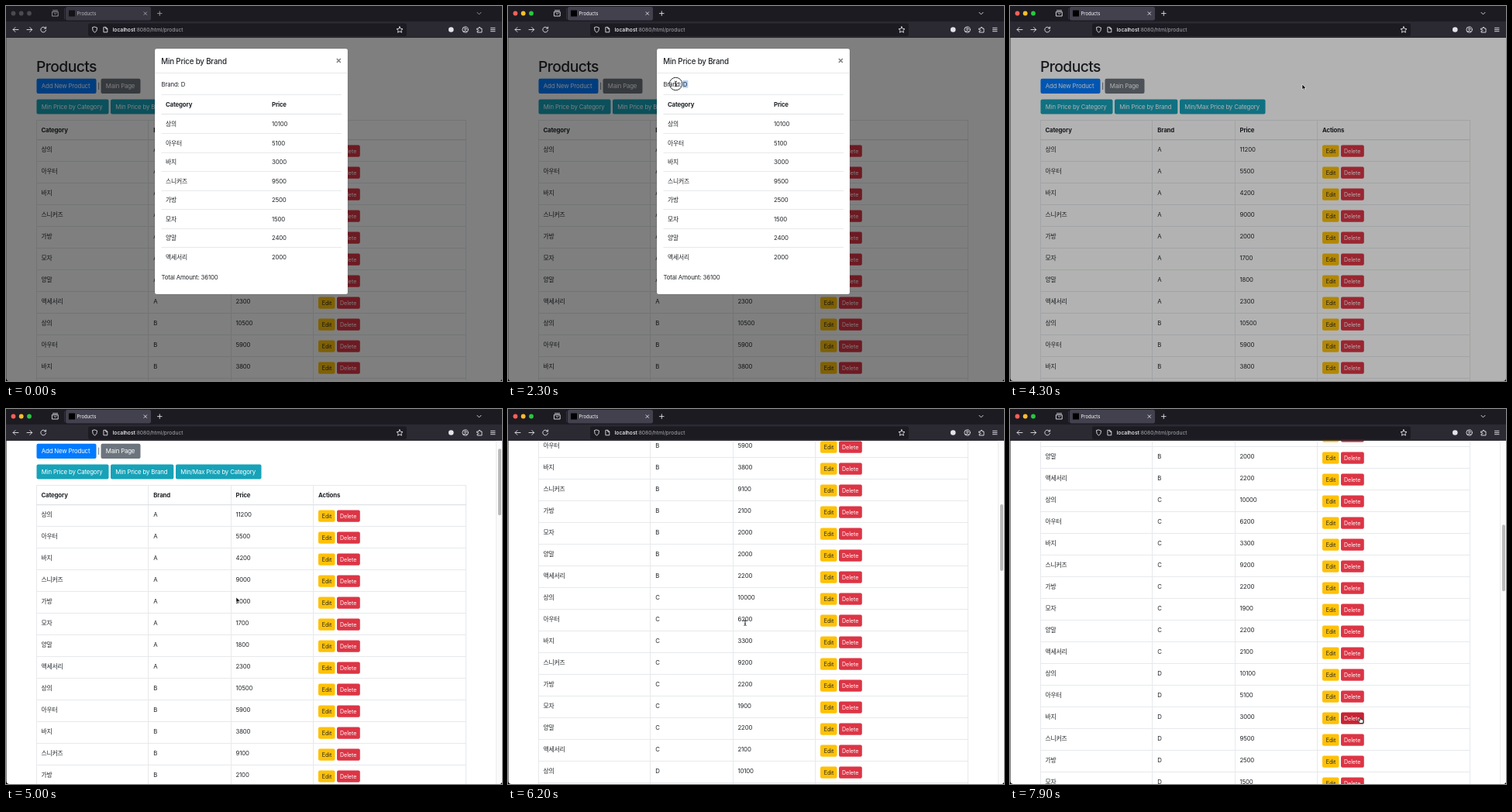
These frames come from a looping animation (640 px wide and 484 px high, 8 s). An HTML page:

```html
<!DOCTYPE html>
<html lang="ko">
<head>
<meta charset="utf-8">
<title>Products</title>
<style>
html, body { margin: 0; width: 100%; height: 100%; overflow: hidden; background: #000; }
svg { display: block; width: 640px; height: 484px; }
text {
  font: 7.8px Inter, "Noto Sans CJK KR", "Noto Sans CJK", sans-serif;
  letter-spacing: -.02em; fill: #212529; white-space: pre;
}
.b { font-weight: 700; }
.h1 { font-size: 19.3px; font-weight: 500; letter-spacing: -.03em; }
.title { font-size: 9.75px; font-weight: 500; }
.sm { font-size: 7px; letter-spacing: 0; }
.w { fill: #fff; }
.tab { font-size: 5.9px; fill: #fbfbfe; letter-spacing: 0; }
.url { font-size: 6.7px; fill: #a9a8b0; letter-spacing: 0; }
.url tspan { fill: #fbfbfe; font-weight: 500; }
.icon { fill: none; stroke: #e4e3ea; stroke-width: .9; stroke-linecap: round; stroke-linejoin: round; }
</style>
</head>
<body>
<svg id="stage" viewBox="0 0 640 484">
  <defs>
    <clipPath id="view"><path d="M.5 40.5H640V480Q640 484 636 484H4.500Q.5 484 .5 480Z"/></clipPath>
  </defs>
  <g clip-path="url(#view)">
    <rect y="40" width="640" height="444" fill="#fff"/>
    <g id="page"></g>
    <g id="bar">
      <rect x="632.5" y="40" width="8" height="444" fill="#fafafa"/>
      <path d="M632.500 40V484" stroke="#ececec"/>
      <rect id="thumb" x="635" width="4" height="86" rx="2" fill="#b9b9b9"/>
    </g>
    <rect id="backdrop" y="40" width="640" height="444"/>
    <g id="modal"></g>
  </g>

  <rect width="640" height="20.500" fill="#1c1b22"/>
  <rect y="20" width="640" height="20.500" fill="#2b2a33"/>
  <rect y="40" width="640" height=".6" fill="#121117"/>
  <g id="lights">
    <circle cx="9.500" cy="9.500" r="2.900"/><circle cx="19.700" cy="9.500" r="2.900"/><circle cx="30" cy="9.500" r="2.900"/>
  </g>
  <path d="M75.500 3V17" stroke="#45444d" stroke-width=".6"/>
  <rect id="tab" x="77" y="1" width="110" height="17.500" rx="2.200"/>
  <g id="top">
    <rect x="81" y="5.500" width="8" height="8" fill="#000"/>
    <text class="tab" x="91.500" y="11.700">Products</text>
    <g class="icon">
      <path d="M60.500 5.700H66.500M59.800 7.500H67.200V13H59.800ZM62 9.500Q63.500 11.500 65 9.500"/>
      <path d="M178 7.800L181.600 11.400M181.600 7.800L178 11.400M198.300 6.800V12.400M195.500 9.600H201.100M608 8.300L610.500 10.800L613 8.300"/>
    </g>
  </g>
  <rect x="106" y="22.500" width="411" height="16.500" rx="2.200" fill="#1c1b22"/>
  <text class="url" x="137.700" y="33"><tspan>localhost</tspan>:8080/html/product</text>
  <g class="icon">
    <path d="M16 30.500H9.200M12 27.600L9.100 30.500L12 33.400M27 30.500H33.600M30.800 27.600L33.700 30.500L30.800 33.400"/>
    <path d="M51 28.500A3.400 3.400 0 1 0 51.600 31.200M51.600 27V29H49.500"/>
    <path d="M114.500 27L117.500 28Q117.800 32.500 114.500 34.300Q111.200 32.500 111.500 28Z"/>
    <path d="M126.300 27.300H129L130.800 29.200V33.800H126.300ZM128.800 27.500V29.400H130.600"/>
    <path d="M508 26.700L509.200 29.300L512 29.600L509.900 31.500L510.500 34.200L508 32.800L505.500 34.200L506.100 31.500L504 29.600L506.800 29.300Z"/>
    <circle cx="592.600" cy="30.500" r="3.700"/><circle cx="592.600" cy="29.500" r="1.200"/><path d="M590.300 33Q592.600 30.700 594.900 33"/>
    <path d="M608 29H610V27.800Q611 26.500 612 27.800V29H614V34H608V32.500Q610 32.200 610 31.500Q610 30.700 608 30.500Z"/>
    <path d="M625.500 28.300H631M625.500 30.500H631M625.500 32.700H631"/>
  </g>
  <circle cx="574.300" cy="30.500" r="3.300" fill="#e4e3ea"/>

  <g id="mouse">
    <circle id="press" r="8.200" fill="none" stroke="#333"/>
    <path id="arrow" d="M0 0V6.800L1.600 5.400L2.700 7.900L3.900 7.400L2.800 5H5Z" fill="#000" stroke="#fff" stroke-width=".6"/>
    <path id="beam" d="M-1.600 -3.400Q0 -3.400 0 -2.300Q0 -3.400 1.600 -3.400M0 -2.500V2.500M-1.600 3.400Q0 3.400 0 2.300Q0 3.400 1.600 3.400M-.8 .9H.8" fill="none" stroke="#222" stroke-width=".9"/>
    <path id="hand" d="M-.7 -3Q0 -3.900 .6 -3V-.6L3.300 .2Q4.200 .6 3.900 2L3.300 4.500H-.6L-2.800 1.500Q-2.800 .5 -1.800 .9L-.7 1.800Z" fill="#fff" stroke="#111" stroke-width=".7"/>
  </g>
</svg>
<script>
const LOOP = 8000, STEP = 100, ROW = 28, TOP = 173;
const CATEGORIES = ["상의", "아우터", "바지", "스니커즈", "가방", "모자", "양말", "액세서리"];
const PRICES = {
  A: [11200, 5500, 4200, 9000, 2000, 1700, 1800, 2300],
  B: [10500, 5900, 3800, 9100, 2100, 2000, 2000, 2200],
  C: [10000, 6200, 3300, 9200, 2200, 1900, 2200, 2100],
  D: [10100, 5100, 3000, 9500, 2500, 1500, 2400, 2000]
};
const COLOR = {
  blue: "#007bff", grey: "#6c757d", teal: "#17a2b8",
  edit: "#ffc107", editHover: "#e0a800", del: "#dc3545", delHover: "#c82333"
};

// Tables of [time, value] and [time, x, y]
const SCROLL = [[4600, 0], [5000, 49], [5600, 230], [6200, 390], [6800, 490], [7200, 516]];
const MOUSE = [
  [1300, 330, 190], [2000, 234, 101], [2300, 216.5, 100.5], [3300, 216.5, 100.5],
  [3900, 424, 70], [4100, 424, 70], [4300, 377, 101], [5000, 297, 243],
  [6200, 306, 276], [7200, 335, 300], [7900, 452, 401]
];
const FOCUS_AT = 1400, SELECT = [2100, 4000], CLOSE_AT = 4090, FADE = 150;
const PRESSES = [[2000, 2400], [4000, 4050]];
const BEAMS = [[1900, 3400], [5500, 7250]];

const $ = id => document.getElementById(id);
const clamp = v => Math.max(0, Math.min(1, v));
const within = (t, [a, b]) => t >= a && t < b;
const show = (node, on) => node.setAttribute("visibility", on ? "inherit" : "hidden");

function add(parent, tag, attrs, content) {
  const node = document.createElementNS("http://www.w3.org/2000/svg", tag);
  for (const k in attrs) node.setAttribute(k, attrs[k]);
  if (content !== undefined) node.textContent = content;
  return parent.appendChild(node);
}
const label = (g, x, y, s, cls = "") => add(g, "text", { x, y, class: cls }, s);
const line = (g, d, stroke = "#e6e9ec", width = 1) =>
  add(g, "path", { d, stroke, "stroke-width": width, fill: "none" });

function button(g, x, y, width, height, fill, s, cls, pad) {
  const box = add(g, "rect", { x, y, width, height, rx: 2, fill });
  label(g, x + pad, y + height / 2 + 2.8, s, cls);
  return box;
}

function buildPage(g) {
  label(g, 39, 85.3, "Products", "h1");
  button(g, 39.5, 93.8, 77, 19.2, COLOR.blue, "Add New Product", "w", 6.3);
  label(g, 118.4, 105.8, "|");
  button(g, 122.5, 93.8, 51, 19.2, COLOR.grey, "Main Page", "w", 6.3);
  button(g, 39.5, 120.6, 93, 19, COLOR.teal, "Min Price by Category", "w", 6.3);
  button(g, 135, 120.6, 81.3, 19, COLOR.teal, "Min Price by Brand", "w", 6.3);
  button(g, 219, 120.6, 110.5, 19, COLOR.teal, "Min/Max Price by Category", "w", 6.3);

  const cols = [45.5, 190.3, 296.5, 403];
  ["Category", "Brand", "Price", "Actions"].forEach((s, i) => label(g, cols[i], 163.2, s, "b"));

  const rows = [];
  for (const brand in PRICES) PRICES[brand].forEach((price, i) => {
    const y = TOP + rows.length * ROW;
    [CATEGORIES[i], brand, price].forEach((s, c) => label(g, cols[c], y + 14.9, s));
    rows.push({
      edit: button(g, 403, y + 6.5, 21.5, 15.2, COLOR.edit, "Edit", "sm", 4.7),
      del: button(g, 427, y + 6.5, 29.8, 15.2, COLOR.del, "Delete", "sm w", 4)
    });
    line(g, `M39.5 ${y + ROW - .5}H594`);
  });
  const end = TOP + rows.length * ROW;
  line(g, "M39.5 147.500H594");
  line(g, [39.5, 183.5, 290.5, 396.5, 593.5].map(x => `M${x} 147.500V${end}`).join(""));
  line(g, `M39.5 ${TOP - .3}H594`, "#dee2e6", 1.3);
  return rows;
}

function buildModal(g) {
  add(g, "rect", { x: 192, y: 55, width: 249, height: 317, rx: 2.5, fill: "#fff", stroke: "#000", "stroke-opacity": .2, "stroke-width": .6 });
  label(g, 200.3, 74.5, "Min Price by Brand", "title");
  const focus = add(g, "rect", { x: 417, y: 55.5, width: 23.5, height: 28, fill: "none", stroke: "#777", "stroke-width": .7 });
  const close = line(g, "M426.800 68L431.800 73M431.800 68L426.800 73", "#7f7f7f", 1.5);
  line(g, "M192.500 86.500H440.500");
  const mark = add(g, "rect", { x: 225.3, y: 96, width: 7, height: 9.7, fill: "#b4d5fe" });
  label(g, 200.5, 103.8, "Brand: D");
  line(g, "M200.500 114.500H433");
  label(g, 206, 130.3, "Category", "b");
  label(g, 343, 130.3, "Price", "b");
  line(g, "M200.500 139.500H433", "#dee2e6", 1.2);
  CATEGORIES.forEach((s, i) => {
    const y = 152.3 + i * 24.5;
    label(g, 206, y + 2.8, s);
    label(g, 343, y + 2.8, PRICES.D[i]);
    if (i) line(g, `M200.500 ${Math.floor(y - 12.2) + .5}H433`);
  });
  label(g, 200.5, 352.8, "Total Amount: 36100");
  return { focus, close, mark };
}

// Smooth interpolation without overshoot through a table of keys
function curve(keys, t, c = 1) {
  const last = keys.length - 1;
  if (t <= keys[0][0]) return keys[0][c];
  if (t >= keys[last][0]) return keys[last][c];
  const slope = i => (keys[i + 1][c] - keys[i][c]) / (keys[i + 1][0] - keys[i][0]);
  const tangent = i => {
    if (i === 0 || i === last) return 0;
    const a = slope(i - 1), b = slope(i);
    return a * b <= 0 ? 0 : 2 * a * b / (a + b);
  };
  const i = keys.findIndex(k => k[0] > t) - 1;
  const span = keys[i + 1][0] - keys[i][0], u = (t - keys[i][0]) / span, v = 1 - u;
  return keys[i][c] * (1 + 2 * u) * v * v + tangent(i) * span * u * v * v
    + keys[i + 1][c] * u * u * (3 - 2 * u) - tangent(i + 1) * span * u * u * v;
}

const page = $("page"), modal = $("modal");
const rows = buildPage(page), parts = buildModal(modal);

function hovered(x, y, scroll) {
  const pos = y - TOP + scroll, inRow = pos % ROW;
  if (pos < 0 || inRow < 6.5 || inRow > 21.7) return null;
  const kind = x >= 403 && x < 424.5 ? "edit" : x >= 427 && x < 456.8 ? "del" : null;
  const row = rows[Math.floor(pos / ROW)];
  return kind && row ? { kind, box: row[kind] } : null;
}

let lit = null;
function draw(t) {
  const focused = t >= FOCUS_AT;
  ["#ff5f57", "#febc2e", "#28c840"].forEach((c, i) =>
    $("lights").children[i].setAttribute("fill", focused ? c : "#4b4a51"));
  $("tab").setAttribute("fill", focused ? "#42414d" : "#393842");
  $("top").setAttribute("opacity", focused ? 1 : .65);

  const scroll = curve(SCROLL, t);
  page.setAttribute("transform", `translate(0 ${-scroll})`);
  show($("bar"), scroll > 0);
  $("thumb").setAttribute("y", 41 + scroll * .21);

  const gone = t - CLOSE_AT, open = gone < FADE;
  const rise = 25 * (1 - (1 - clamp(gone / 300)) ** 1.8);
  modal.setAttribute("opacity", 1 - clamp(gone / FADE));
  modal.setAttribute("transform", `translate(0 ${-rise})`);
  $("backdrop").setAttribute("opacity", .5 * (1 - clamp((gone - FADE) / FADE)));

  const x = curve(MOUSE, t, 1), y = curve(MOUSE, t, 2);
  const overClose = open && x > 417 && y < 86;
  parts.close.setAttribute("stroke", overClose ? "#000" : "#7f7f7f");
  show(parts.focus, t >= 4000);
  show(parts.mark, within(t, SELECT));

  if (lit) lit.box.setAttribute("fill", COLOR[lit.kind]);
  lit = t > 7250 ? hovered(x, y, scroll) : null;
  if (lit) lit.box.setAttribute("fill", COLOR[lit.kind + "Hover"]);

  const shape = lit || overClose ? "hand" : BEAMS.some(b => within(t, b)) ? "beam" : "arrow";
  for (const id of ["hand", "beam", "arrow"]) show($(id), id === shape);
  show($("press"), PRESSES.some(p => within(t, p)));
  $("mouse").setAttribute("transform", `translate(${x} ${y})`);
  $("mouse").setAttribute("visibility", t >= MOUSE[0][0] ? "visible" : "hidden");
}

const start = performance.now();
function tick() {
  const t = (performance.now() - start) % LOOP;
  draw(Math.floor(t / STEP) * STEP);
  requestAnimationFrame(tick);
}
tick();
</script>
</body>
</html>
```
